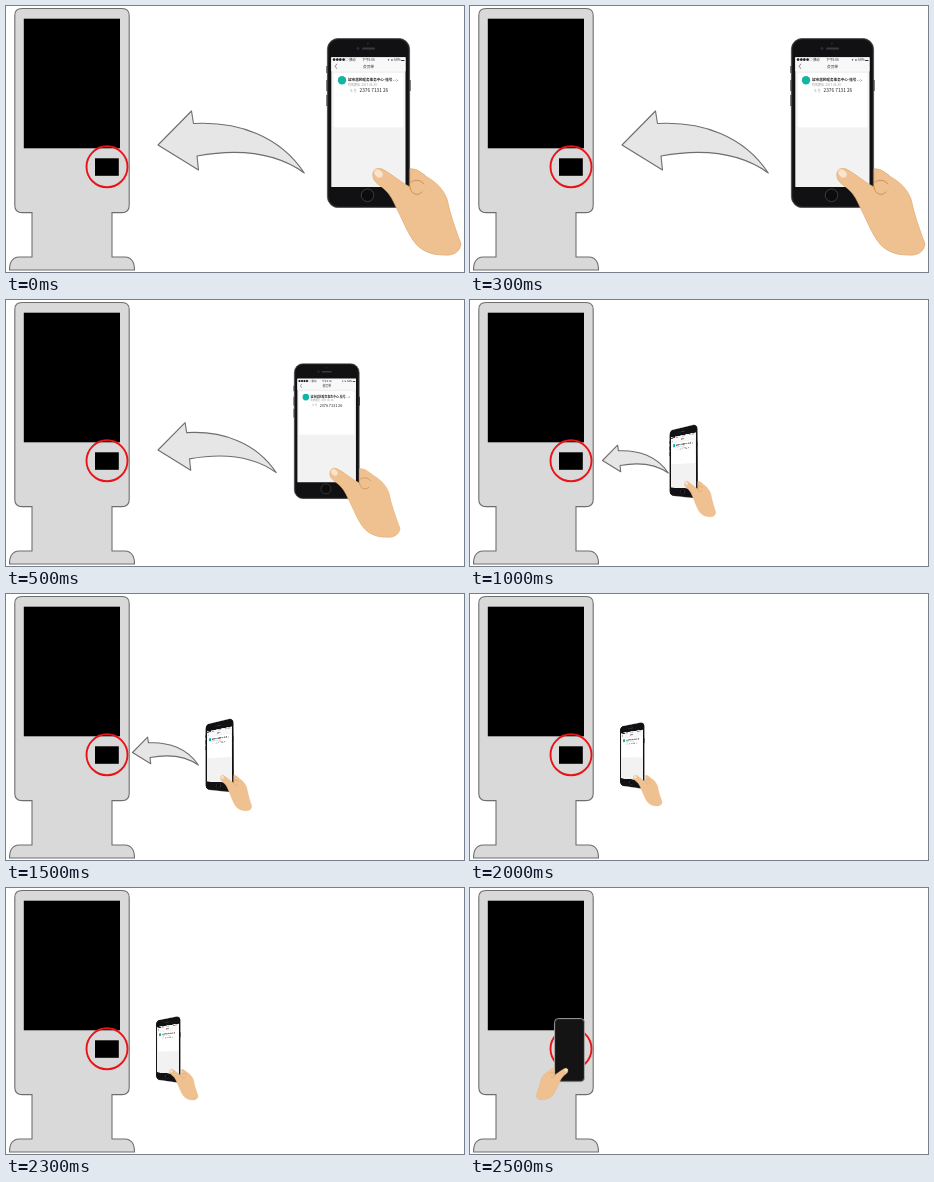
Write an HTML page that moves like this. It is 458 px wide and 266 px high and loops after 3 s.

```html
<!DOCTYPE html>
<html lang="zh">
<head>
<meta charset="utf-8">
<style>
  html, body { margin: 0; width: 100%; height: 100%; overflow: hidden; background: #fff; }
  svg { position: absolute; left: 0; top: 0; overflow: visible; }
  #phone { transform-origin: 0 0; }
  text { font-family: "Noto Sans CJK SC", "Noto Sans CJK", "Noto Sans", sans-serif; }
</style>
</head>
<body>
<svg width="458" height="266" viewBox="0 0 458 266">
  <path fill="#d9d9d9" stroke="#6e6e6e" stroke-width="1.1" d="M16 2.5H116Q123.2 2.5 123.2 9.500V199.500Q123.200 206.600 116 206.600H106V251H119Q128.500 251.500 128.500 264H3.500Q3.500 251.500 13 251H26V206.600H16Q8.800 206.600 8.800 199.500V9.500Q8.800 2.500 16 2.500Z"/>
  <rect x="17.800" y="12.700" width="96.200" height="129.600"/>
  <rect x="89" y="152.300" width="23.800" height="17.500"/>
  <circle cx="101" cy="160.800" r="20.500" fill="none" stroke="#e8141a" stroke-width="1.900"/>
  <path id="arrow" fill="#e7e6e6" stroke="#6e6e6e" stroke-width="1.100" stroke-linejoin="round" vector-effect="non-scaling-stroke" d="M0 0L33.500-34L35.500-21.500C80-24 122-9 146.300 28C120 9 83 3 39 11L40.500 25Z"/>
  <g id="back">
    <rect x="84.500" y="130.500" width="30" height="63.300" rx="4" fill="#141414" stroke="#b4b4b4" stroke-width=".8"/>
    <rect x="85.600" y="131.600" width="27.800" height="61.100" rx="3.200" fill="none" stroke="#303030" stroke-width=".6"/>
  </g>
</svg>

<svg id="phone" width="83" height="170" viewBox="0 0 83 170">
  <path d="M0 28v7M0 42v11M0 57v11M83 42v11" stroke="#333" stroke-width="1.200"/>
  <rect x=".4" y=".4" width="82.200" height="169.200" rx="11" fill="#1b1b1d" stroke="#4a4a4c" stroke-width=".8"/>
  <rect x="2" y="2" width="79" height="166" rx="9.500" fill="#111113"/>
  <circle cx="41" cy="5.500" r="1" fill="#2e2e33"/>
  <circle cx="31" cy="10.500" r="1.400" fill="#2b2b35"/>
  <rect x="35" y="9.500" width="13" height="2" rx="1" fill="#3a3a3c"/>
  <circle cx="40.500" cy="157.300" r="6.300" fill="#0c0c0d" stroke="#48484a" stroke-width=".8"/>
  <rect x="4.300" y="19.300" width="74.200" height="129.700" fill="#f2f2f2"/>
  <rect x="4.300" y="19.300" width="74.200" height="14" fill="#f8f8f8"/>
  <rect x="6.500" y="35" width="70" height="54.500" rx="1.500" fill="#fff"/>
  <g fill="#222">
    <text x="5.500" y="23.300" font-size="3.200">●●●●○ 移动</text>
    <text x="41.500" y="23.300" font-size="3.200" text-anchor="middle">下午5:06</text>
    <text x="77.500" y="23.300" font-size="3.200" text-anchor="end">✦ ➤ 68% ▬</text>
    <text x="41.500" y="29.800" font-size="3.700" text-anchor="middle">会员单</text>
    <text x="21" y="43" font-size="3.600" font-weight="700">城市居民服务事务中心-挂号...</text>
    <text x="32.500" y="54.300" font-size="4.800">2376 7131 26</text>
  </g>
  <g fill="#999">
    <text x="21" y="47.600" font-size="3">有效期至: 2017-06-30</text>
    <text x="22.500" y="54" font-size="3.200">卡 号</text>
  </g>
  <path d="M10 25.800L8 28.300L10 30.800M69.500 41.500l1 1l-1 1" fill="none" stroke="#555" stroke-width=".7"/>
  <circle cx="15" cy="42.300" r="4.200" fill="#12b5a5"/>
</svg>

<svg width="458" height="266" viewBox="0 0 458 266">
  <g id="hand">
    <path fill="#f0c190" stroke="#dfa86f" stroke-width=".7" d="M0 8C-1 2 4-1 9 1C19 6 27 14 37 19V1C43 0 49 5 54 9C64 15 70 21 74 31C77 46 82 60 88 76C87 84 80 88 71 87C60 87 50 84 43 76C35 67 30 52 23 39C19 30 16 25 10 20C5 16 0 13 0 8Z"/>
    <path fill="none" stroke="#c58d55" stroke-width=".9" stroke-linecap="round" d="M37 19C38 26 44 29 49 24M38 14C43 11 48 12 51 16"/>
    <ellipse cx="5.500" cy="5.500" rx="4.600" ry="3.500" transform="rotate(40 5.500 5.500)" fill="#f9e3cd"/>
  </g>
</svg>

<script>
const STEP = 500;
const el = id => document.getElementById(id);

// phone: corners from top left, clockwise; arrow: x, y, scale; hand: x, y, scale x, scale y
const poses = [
  { phone: [321, 32, 404, 32, 404, 202, 321, 202], arrow: [152, 139, 1], hand: [367, 162, 1, 1] },
  { phone: [288, 63.3, 353.5, 63.3, 353.5, 199, 288, 199], arrow: [152, 150, .808], hand: [324, 168, .795, .795] },
  { phone: [199.5, 130.5, 227.5, 123.8, 228, 198.5, 199.5, 195.5], arrow: [132.5, 160.5, .45], hand: [214.5, 181, .355, .41] },
  { phone: [199.5, 130.5, 227.5, 123.8, 228, 198.5, 199.5, 195.5], arrow: [126.5, 158.5, .45], hand: [214.5, 181, .355, .41] },
  { phone: [150, 132.5, 174.5, 127.8, 174.5, 195, 150, 191.5], hand: [163.5, 181, .325, .355] },
  { hand: [98, 180, -.364, .364] }
];

// Perspective matrix taking a w by h box onto four corners
function warp([x0, y0, x1, y1, x2, y2, x3, y3], w, h) {
  const ax = x1 - x2, ay = y1 - y2, bx = x3 - x2, by = y3 - y2;
  const sx = x0 - x1 + x2 - x3, sy = y0 - y1 + y2 - y3;
  const den = ax * by - bx * ay;
  const g = (sx * by - bx * sy) / den, k = (ax * sy - sx * ay) / den;
  const m = [
    (x1 - x0 + g * x1) / w, (y1 - y0 + g * y1) / w, 0, g / w,
    (x3 - x0 + k * x3) / h, (y3 - y0 + k * y3) / h, 0, k / h,
    0, 0, 1, 0, x0, y0, 0, 1
  ];
  return `matrix3d(${m.map(v => v.toFixed(7))})`;
}

function show(id, on) {
  el(id).style.display = on ? "" : "none";
}

function place(id, [x, y, sx, sy = sx]) {
  el(id).setAttribute("transform", `translate(${x} ${y}) scale(${sx} ${sy})`);
}

let last = -1;
function draw(t) {
  const i = Math.floor(t / STEP) % poses.length;
  if (i === last) return;
  last = i;
  const { phone, arrow, hand } = poses[i];
  show("phone", phone);
  show("back", !phone);
  show("arrow", arrow);
  if (phone) el("phone").style.transform = warp(phone, 83, 170);
  if (arrow) place("arrow", arrow);
  place("hand", hand);
}

const start = performance.now();
function tick() {
  draw(performance.now() - start);
  requestAnimationFrame(tick);
}
tick();
</script>
</body>
</html>
```
